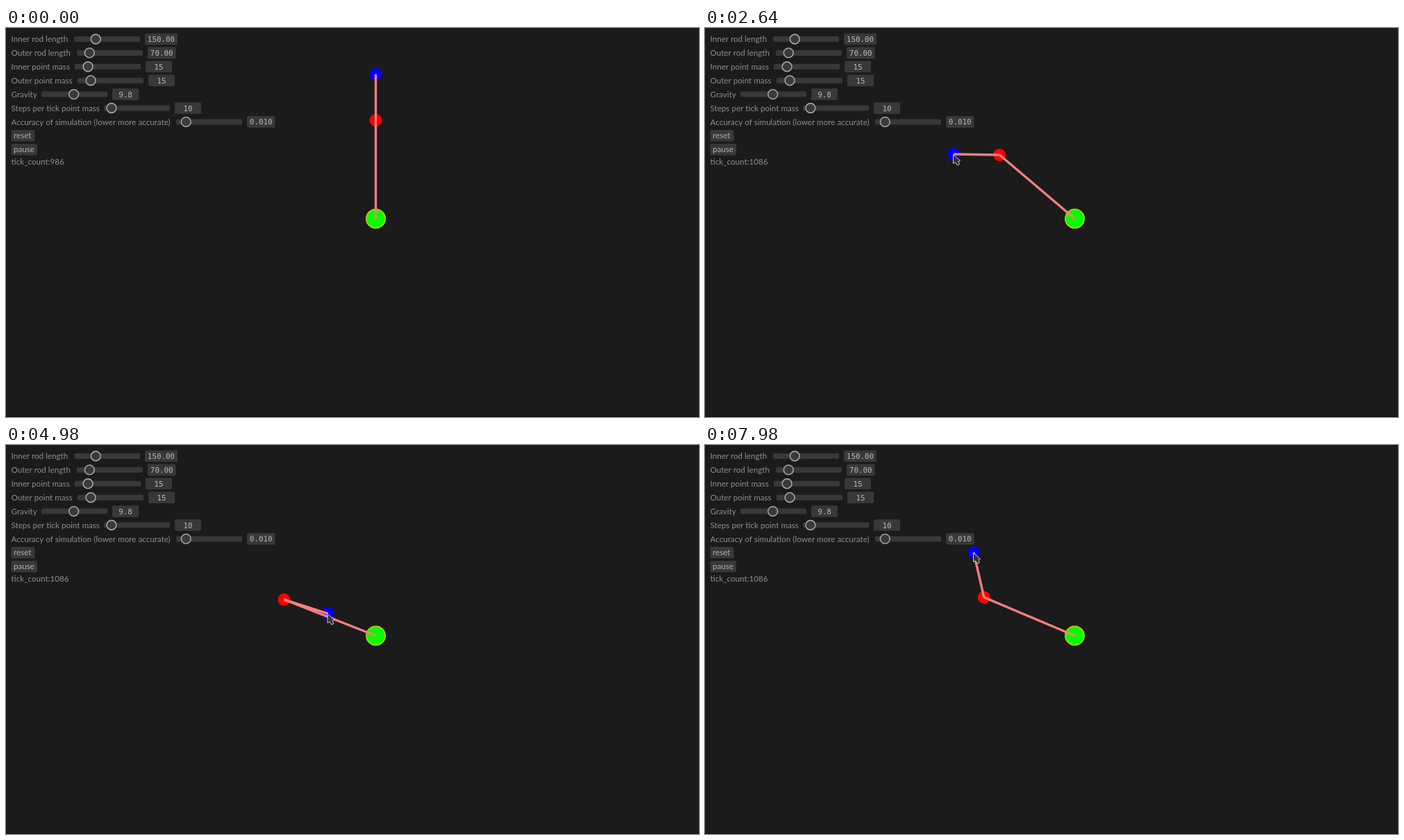
These frames come from a looping animation (998 px wide and 561 px high, 8 s). An HTML page with a canvas:

```html
<!DOCTYPE html>
<html lang="en">
<head>
<meta charset="utf-8">
<title>Double pendulum</title>
<style>
  html, body { margin: 0; width: 100%; height: 100%; overflow: hidden; background: #1b1b1b; }
  canvas { display: block; }
</style>
</head>
<body>
<canvas id="stage" width="998" height="561"></canvas>
<script>
const ctx = document.getElementById('stage').getContext('2d');
const LOOP = 8000, STEP = 60, GRAB = 840, FLIP = 4900;
const BASE = { x: 532.5, y: 275 }, INNER = 142, OUTER = 66.3;
const LABEL = '11.65px Lato, "Open Sans", sans-serif';
const VALUE = '10.9px "DejaVu Sans Mono", monospace';
const TRACK = 95, KNOB = 6.9;

const SLIDERS = [
  { label: 'Inner rod length', x: 98, value: '150.00', max: 500 },
  { label: 'Outer rod length', x: 102, value: '70.00', max: 500 },
  { label: 'Inner point mass', x: 99, value: '15', max: 100 },
  { label: 'Outer point mass', x: 103, value: '15', max: 100 },
  { label: 'Gravity', x: 51, value: '9.8', max: 20 },
  { label: 'Steps per tick point mass', x: 141, value: '10', max: 200 },
  { label: 'Accuracy of simulation (lower more accurate)', x: 245, value: '0.010', max: 0.11 },
];

// Key points of the pointer: time, x, y
const APPROACH = [[STEP, 500, 393], [GRAB, 533, 68]];
const DRAG = [
  [GRAB, 532.5, 60], [1860, 470, 90], [2640, 358, 182], [3300, 331, 286],
  [4020, 390, 289.5], [4980, 463.55, 243.1], [5880, 434, 194], [6360, 397, 200],
  [6720, 371, 246], [7150, 408, 315], [7560, 402, 264], [7980, 387, 155],
];

// Cubic Hermite through timed points, with slopes taken from the neighbours.
function along(path, t) {
  const last = path.length - 1;
  const time = Math.min(Math.max(t, path[0][0]), path[last][0]);
  const i = Math.max(path.findIndex(p => p[0] >= time) - 1, 0);
  const a = path[i], b = path[i + 1], span = b[0] - a[0], u = (time - a[0]) / span;
  const slope = (k, axis) => {
    const p = path[Math.max(k - 1, 0)], q = path[Math.min(k + 1, last)];
    return (q[axis] - p[axis]) / (q[0] - p[0]) * span;
  };
  const mix = axis => {
    const m = slope(i, axis), n = slope(i + 1, axis), d = b[axis] - a[axis];
    return a[axis] + u * (m + u * (3 * d - 2 * m - n + u * (m + n - 2 * d)));
  };
  return { x: mix(1), y: mix(2) };
}

// Places both masses so that the outer one follows the pointer.
function solveArm(goal, side) {
  const dx = goal.x - BASE.x, dy = goal.y - BASE.y;
  const reach = Math.min(Math.max(Math.hypot(dx, dy), INNER - OUTER), INNER + OUTER);
  const angle = Math.atan2(dy, dx);
  const cos = (reach ** 2 + INNER ** 2 - OUTER ** 2) / (2 * reach * INNER);
  const bend = side * Math.acos(Math.min(1, cos));
  const polar = (a, r) => ({ x: BASE.x + r * Math.cos(a), y: BASE.y + r * Math.sin(a) });
  return { elbow: polar(angle + bend, INNER), tip: polar(angle, reach), hub: polar(angle + bend, 13) };
}

function text(str, x, y, font = LABEL, color = '#8e8e8e', align = 'left') {
  ctx.font = font;
  ctx.fillStyle = color;
  ctx.textAlign = align;
  ctx.fillText(str, x, y);
}

function box(x, y, w, h) {
  ctx.fillStyle = '#383838';
  ctx.beginPath();
  ctx.roundRect(x, y, w, h, 2);
  ctx.fill();
}

function disc(p, r, fill, stroke, width) {
  ctx.beginPath();
  ctx.arc(p.x, p.y, r, 0, 2 * Math.PI);
  ctx.fillStyle = fill;
  ctx.fill();
  if (!stroke) return;
  ctx.strokeStyle = stroke;
  ctx.lineWidth = width;
  ctx.stroke();
}

function rod(a, b, color = '#fa7e7e') {
  ctx.strokeStyle = color;
  ctx.lineWidth = 3.4;
  ctx.beginPath();
  ctx.moveTo(a.x, a.y);
  ctx.lineTo(b.x, b.y);
  ctx.stroke();
}

function drawSlider({ label, x, value, max }, row) {
  const y = 16 + row * 19.9;
  const width = Math.max(38, 8 + 6.5 * value.length);
  text(label, 7.5, y + 4.2);
  box(x, y - 4, TRACK, 8);
  disc({ x: x + KNOB + (TRACK - 2 * KNOB) * value / max, y }, KNOB, '#3a3a3a', '#a4a4a4', 1.6);
  box(x + TRACK + 7, y - 8.3, width, 16.6);
  text(value, x + TRACK + 7 + width / 2, y + 4, VALUE, '#bababa', 'center');
}

function drawButton(label, y, width) {
  box(7.5, y, width, 16.6);
  text(label, 11, y + 12.4, LABEL, '#b2b2b2');
}

function drawArm({ elbow, tip, hub }) {
  disc(BASE, 13.7, '#00ff00', '#c4c814', 1.6);
  disc(elbow, 9, '#ff0000');
  disc(tip, 9, '#0000ff');
  rod(BASE, elbow);
  rod(elbow, tip);
  rod(BASE, hub, '#c8a050');
}

const ARROW = new Path2D('M0 0V13L3 11.5L6 15.5L9 14L7 10L10 9Z');
function drawPointer({ x, y }) {
  ctx.save();
  ctx.translate(x - 0.5, y + 0.5);
  ctx.fillStyle = '#333';
  ctx.strokeStyle = '#c8c8c8';
  ctx.lineWidth = 1;
  ctx.lineJoin = 'round';
  ctx.fill(ARROW);
  ctx.stroke(ARROW);
  ctx.restore();
}

function draw(t) {
  ctx.fillStyle = '#1b1b1b';
  ctx.fillRect(0, 0, 998, 561);
  ctx.fillStyle = '#101010';
  ctx.fillRect(0, 560, 998, 1);
  SLIDERS.forEach(drawSlider);
  drawButton('reset', 147, 34);
  drawButton('pause', 167, 37.5);
  text('tick_count:' + (986 + Math.floor(100 * Math.min(t / GRAB, 1))), 7.5, 197.4);

  const arm = solveArm(along(DRAG, t), t < FLIP ? 1 : -1);
  drawArm(arm);
  if (t >= STEP) drawPointer(t < GRAB ? along(APPROACH, t) : arm.tip);
}

const start = performance.now();
function tick() {
  const t = (performance.now() - start) % LOOP;
  draw(Math.floor(t / STEP) * STEP);
  requestAnimationFrame(tick);
}
tick();
</script>
</body>
</html>
```
